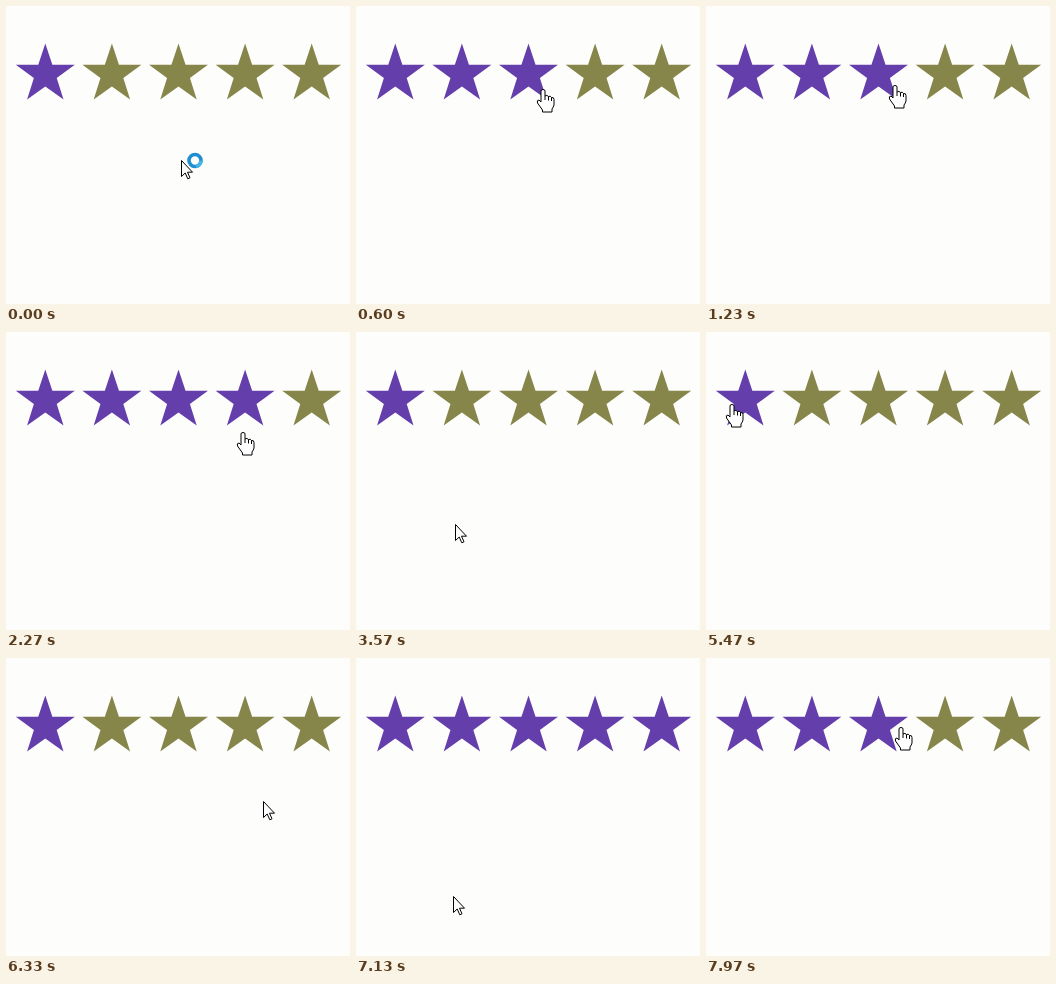
Write an HTML page with a canvas that moves like this. It is 344 px wide and 298 px high and loops after 8 s.

```html
<!DOCTYPE html>
<html lang="en">
<head>
<meta charset="utf-8">
<title>Star rating</title>
<style>
  html, body { margin: 0; width: 100%; height: 100%; overflow: hidden; background: #fdfdfb; }
  canvas { display: block; }
</style>
</head>
<body>
<canvas id="stage" width="344" height="298"></canvas>
<script>
const ctx = document.getElementById('stage').getContext('2d');
const LOOP = 8000, CELL = 66.6, LEFT = 6, MID = 68.4;

// Turning points of the pointer: arrival time, x, y, pause.
// A pause over a star is a click on it.
const stops = [
  [0, 175, 154], [500, 186, 86], [1230, 188, 79], [1450, 236, 80],
  [1900, 190, 176], [2270, 237, 99], [2510, 225, 174], [2800, 236, 76],
  [3050, 120, 80], [3570, 99, 193], [3850, 110, 95], [4230, 193, 81, 170],
  [4770, 160, 240, 260], [5400, 24, 70, 70], [5850, 318, 279],
  [6330, 257, 144], [6630, 293, 80, 100], [7130, 97, 238, 170], [7970, 195, 69]
];

const arrow = new Path2D('M.5 .5V16.5L4.2 13 6.8 18.8 9 17.8 6.5 12.2H11.5Z');
const hand = new Path2D('M-2 13V2Q-2 .5 0 .5T2 2V7Q4 5.5 5.5 7.5Q7.5 6.5 8.5 8.5' +
  'Q11 8 11 10.5V16Q10.5 18 9 20V23H-.5V21L-5.5 14Q-6.5 11 -4 11Z' +
  'M2 7V11M5.5 7.5V11.5M8.5 8.5V12');

const easeOut = k => 1 - (1 - k) ** 3;

function pointerAt(t) {
  const i = stops.findLastIndex(s => s[0] <= t);
  const [t0, x0, y0, pause = 0] = stops[i];
  const [t1, x1, y1] = stops[i + 1] || stops[i];
  const k = easeOut(Math.max(0, t - t0 - pause) / (t1 - t0 - pause || LOOP));
  return [x0 + (x1 - x0) * k, y0 + (y1 - y0) * k];
}

function starUnder(x, y) {
  return y > 34 && y < 104 ? Math.floor((x - LEFT) / CELL) + 1 : 0;
}

function ratingAt(t) {
  const click = stops.findLast(([at, x, y, pause]) => pause && at + pause / 2 <= t && starUnder(x, y));
  return click ? starUnder(click[1], click[2]) : 1;
}

function drawStar(cx, color) {
  ctx.beginPath();
  for (let i = 0; i < 10; i++) {
    const r = i % 2 ? 12 : 31, a = i * Math.PI / 5;
    ctx.lineTo(cx + r * Math.sin(a), MID - r * Math.cos(a));
  }
  ctx.fillStyle = color;
  ctx.fill();
}

function drawArc(from, sweep, color) {
  ctx.beginPath();
  ctx.arc(14, 0.5, 6, from, from + sweep);
  ctx.lineWidth = 3.6;
  ctx.strokeStyle = color;
  ctx.stroke();
}

function drawPointer(t, x, y, over) {
  const shape = over ? hand : arrow;
  ctx.save();
  ctx.translate(Math.round(x), Math.round(y));
  if (!over && t < 450) {
    drawArc(0, 2 * Math.PI, '#1f8fd2');
    drawArc(t / 160, 1.4, '#45b4e6');
  }
  ctx.fillStyle = '#fff';
  ctx.strokeStyle = '#000';
  ctx.lineWidth = 1;
  ctx.fill(shape);
  ctx.stroke(shape);
  ctx.restore();
}

function draw(t) {
  const [x, y] = pointerAt(t);
  const over = starUnder(x, y);
  const lit = over || ratingAt(t);
  ctx.fillStyle = '#fdfdfb';
  ctx.fillRect(0, 0, 344, 298);
  for (let i = 0; i < 5; i++) {
    drawStar(LEFT + (i + 0.5) * CELL, i < lit ? '#643eab' : '#86854a');
  }
  drawPointer(t, x, y, over);
}

const start = performance.now();
function tick() {
  draw((performance.now() - start) % LOOP);
  requestAnimationFrame(tick);
}
tick();
</script>
</body>
</html>
```
